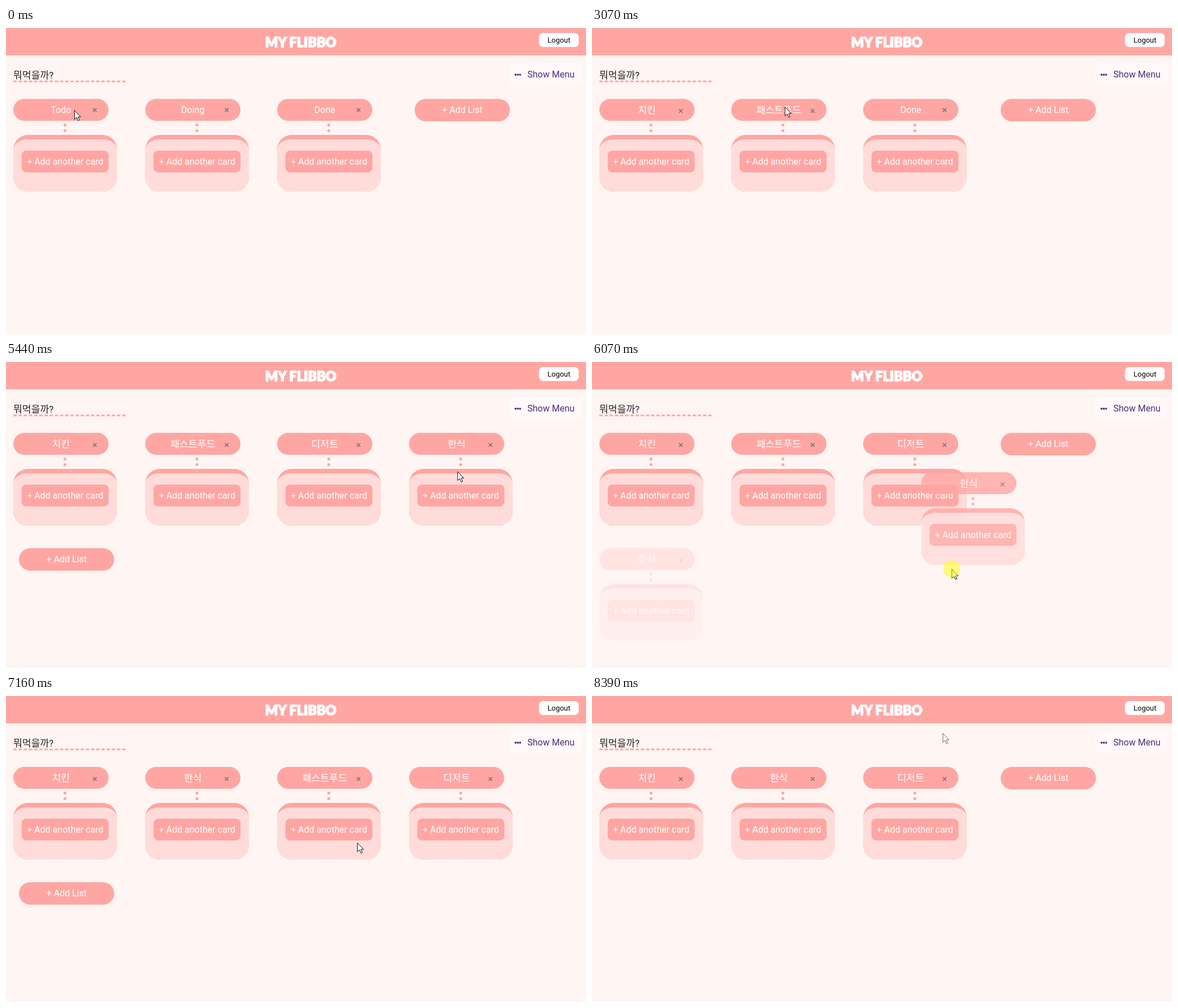
An HTML page for the animation above (8.63 s loop, 1029 by 544 pixels).

```html
<!DOCTYPE html>
<html lang="ko">
<head>
<meta charset="utf-8">
<title>Board</title>
<style>
  html, body { margin: 0; width: 100%; height: 100%; overflow: hidden; background: #fff5f3; }
  svg { display: block; width: 1029px; height: 544px; }
  text { font: 16px Roboto, 'Noto Sans CJK KR', 'Noto Sans CJK', sans-serif; white-space: pre; }
  .mid { text-anchor: middle; }
  .w { fill: #fff; }
  .main { fill: #ffa6a3; }
  .soft { fill: #ffdcda; }
  .logo { font: 900 23.5px Lato, sans-serif; stroke: #fff; stroke-width: 1.5; stroke-linejoin: round; }
  .box { filter: drop-shadow(0 1px 2px rgba(0, 0, 0, .5)); }
</style>
</head>
<body>
<svg viewBox="0 0 1029 544">
  <rect width="1029" height="544" fill="#fff5f3"/>
  <rect class="main" width="1029" height="48.7"/>
  <text class="logo mid w" x="523" y="33.5">MY FLIBBO</text>
  <rect class="w" x="945.6" y="9" width="70.4" height="24.7" rx="7"/>
  <text class="mid" x="981" y="26" style="font-size:13px">Logout</text>
  <text x="13" y="89.5" fill="#222" style="font-size:17.2px">뭐먹을까?</text>
  <path d="M13 95H212" stroke="#ffa6a3" stroke-width="3" stroke-dasharray="6 3.19"/>
  <rect x="892" y="62" width="129" height="40" rx="7" fill="#fffaf9"/>
  <g fill="#4b1f6f">
    <circle cx="904" cy="83" r="1.8"/><circle cx="908" cy="83" r="1.8"/><circle cx="912" cy="83" r="1.8"/>
    <text x="925" y="87.5" fill="#4f2a7f">Show Menu</text>
  </g>
  <g id="board"></g>
  <g id="status">
    <path d="M0 525.5H101Q105 525.5 105 529.5V544H0Z" fill="#dee1e6" stroke="#cfd2d8"/>
    <text x="98.5" y="541" text-anchor="end" fill="#4a4d52" style="font-size:12px">localhost:8080/b/2</text>
  </g>
  <g id="dialog">
    <rect class="box w" x="289" y="-10" width="446" height="98" rx="2"/>
    <text x="305" y="19" fill="#5c5055" style="font-size:13.9px">list를 삭제하시겠습니까?</text>
    <rect x="583.5" y="40.5" width="64" height="32" rx="3" fill="#4489ee" stroke="#7fb0f5"/>
    <text class="mid w" x="615.5" y="60.5" style="font-size:13px;font-weight:500">확인</text>
    <rect x="655.5" y="40.5" width="63" height="31" rx="3" fill="#fff" stroke="#dcdcdc"/>
    <text class="mid" x="687" y="60.5" fill="#4a8df0" style="font-size:13px;font-weight:500">취소</text>
  </g>
  <g id="cursor" stroke-linejoin="round">
    <path id="arrow" d="M.5 .5V16.3L4.2 12.9L6.9 18.8L9.3 17.8L6.7 12H11.3Z" fill="#fff" stroke="#111"/>
    <path id="beam" d="M-3.5 -8H-1L0 -7L1 -8H3.5M0 -7V7M-3.5 8H-1L0 7L1 8H3.5" fill="none" stroke="#1f5558" stroke-width="1.3"/>
    <path id="hand" d="M.5 2Q.5 .5 2.1 .5T3.8 2V8.5Q5.5 7 7 8.8Q9 7.7 10 9.5Q12.5 8.8 12.5 11.5V16Q12.5 19 10.8 20V22.5H2.2V20.5Q0 18 -3.7 13Q-4.7 11 -3 10.5Q-1.2 10.3 .5 13ZM3.8 8.5V12M7 8.8V12M10 9.5V12.5" fill="#fff" stroke="#111"/>
    <circle id="press" r="15" fill="#ff0" opacity=".5"/>
  </g>
</svg>
<script>
const LOOP = 8630, ERASE = 88, TYPE = 64;
const HOVER = 7400, ASK = 7700, REMOVE = 8230, FADE = 8385;
const INITIALS = 'ㄱㄲㄴㄷㄸㄹㅁㅂㅃㅅㅆㅇㅈㅉㅊㅋㅌㅍㅎ';
const $ = id => document.getElementById(id);
const at = (rows, t) => rows.filter(r => r[0] <= t).pop();

// what the input shows while Hangul is composed key by key
function strokes(word) {
  const shown = [];
  [...word].forEach((ch, i) => {
    const code = ch.charCodeAt(0) - 0xAC00, tail = code % 28, done = word.slice(0, i);
    shown.push(done + INITIALS[Math.floor(code / 588)]);
    shown.push(done + String.fromCharCode(0xAC00 + code - tail));
    if (tail) shown.push(done + ch);
  });
  return shown;
}

// title history: backspace the old name, type the new one, commit
function rename(old, word, eraseAt, typeAt, doneAt) {
  const erased = [...old, ''].map((_, i) => [eraseAt + i * ERASE, old.slice(0, old.length - i), true]);
  const typed = strokes(word).map((s, i) => [typeAt + i * TYPE, s, true]);
  return [[0, old], ...erased, ...typed, [doneAt, word]];
}

const titles = {
  a: rename('Todo', '치킨', 90, 510, 985),
  b: rename('Doing', '패스트푸드', 1590, 2190, 2915),
  c: rename('Done', '디저트', 3480, 3860, 4255),
  d: [[0, '한식']],
  add: [[0, '+ Add List'], [4635, '', true],
    ...strokes('한식').map((s, i) => [4710 + i * TYPE, s, true]), [5325, '+ Add List']]
};

const orders = [[0, 'abc+'], [5325, 'abcd+'], [5990, 'abc+d'], [6140, 'abdc+'], [6600, 'adbc+'], [REMOVE, 'adc+']];

// start, list, grab offset
const drags = [[0], [5695, 'd', 54, 172], [6225], [6450, 'b', 84, 192], [7005]];

// start, end, x, y, pointer once at rest
const moves = [
  [0, 0, 121, 146, 'arrow'],
  [80, 90, 126, 140, 'beam'],
  [990, 1460, 342, 140, 'beam'],
  [3070, 3450, 598, 140, 'beam'],
  [4050, 4110, 598, 125, 'arrow'],
  [4260, 4560, 815, 148, 'hand'],
  [5330, 5630, 769, 298, 'arrow'],
  [5700, 5900, 740, 372, 'arrow'],
  [5900, 6070, 638, 368, 'arrow'],
  [6080, 6420, 331, 318, 'arrow'],
  [6460, 6610, 470, 320, 'arrow'],
  [6800, 6850, 621, 317, 'arrow'],
  [7010, HOVER, 627, 148, 'hand'],
  [7940, 8160, 616, 58, 'arrow'],
  [8240, 8380, 622, 66, 'arrow']
];

function pointer(t) {
  const move = at(moves, t), [start, end, x, y, kind] = move;
  if (t >= end) return [x, y, kind];
  const [, , x0, y0] = moves[moves.indexOf(move) - 1];
  const k = (t - start) / (end - start), e = k * k * (3 - 2 * k);
  return [x0 + (x - x0) * e, y0 + (y - y0) * e, 'arrow'];
}

function el(parent, tag, attrs, text) {
  const node = document.createElementNS('http://www.w3.org/2000/svg', tag);
  for (const k in attrs) node.setAttribute(k, attrs[k]);
  if (text) node.textContent = text;
  return parent.appendChild(node);
}

function pill(height) {
  const g = el($('board'), 'g', {});
  el(g, 'rect', { class: 'main', width: 169, height, rx: height / 2 });
  const label = el(g, 'text', {});
  const caret = el(g, 'rect', { class: 'w', y: 12.5, width: 1, height: 14 });
  return { g, label, caret };
}

function list() {
  const p = pill(39), g = p.g;
  p.cross = el(g, 'path', { d: 'M-3.2 -3.2L3.2 3.2M3.2 -3.2L-3.2 3.2', 'stroke-width': 1.5 });
  for (const cy of [46.5, 56.5]) el(g, 'circle', { class: 'main', cx: 91.7, cy, r: 2.6 });
  el(g, 'rect', { class: 'main', y: 64, width: 184, height: 101, rx: 26 });
  el(g, 'path', { class: 'soft', d: 'M0 90A26 18 0 0 1 26 72H158A26 18 0 0 1 184 90V139A26 26 0 0 1 158 165H26A26 26 0 0 1 0 139Z' });
  el(g, 'rect', { class: 'main', x: 14.8, y: 92, width: 154.4, height: 38.7, rx: 8 });
  el(g, 'text', { class: 'mid w', x: 92, y: 116.5 }, '+ Add another card');
  return p;
}

function show(node, on) { node.style.display = on ? '' : 'none'; }

function setLabel(p, [, text, editing]) {
  const korean = /[ㄱ-힣]/.test(text);
  p.label.textContent = text;
  p.label.setAttribute('class', editing ? 'w' : 'mid w');
  p.label.setAttribute('x', editing ? 12 : 84.5);
  p.label.setAttribute('y', editing ? 24.5 : korean ? 26.3 : 25);
  p.label.style.fontSize = (editing ? korean ? 14.9 : 14 : korean ? 17.2 : 16) + 'px';
  const caret = editing && korean;
  show(p.caret, caret);
  if (caret) p.caret.setAttribute('x', 12 + p.label.getComputedTextLength());
  if (p.cross) p.cross.setAttribute('transform', `translate(144.5 ${korean && !editing ? 21.5 : 19.8})`);
}

function place(p, x, y, opacity, history, t, cross = '#72707c') {
  p.g.setAttribute('transform', `translate(${x} ${y})`);
  p.g.setAttribute('opacity', opacity);
  setLabel(p, at(history, t));
  if (p.cross) p.cross.setAttribute('stroke', cross);
}

const add = pill(40);
const lists = { a: list(), b: list(), c: list(), d: list() };
const ghost = list();

function draw(t) {
  const order = at(orders, t)[1];
  const [, held, dx, dy] = at(drags, t);
  const [x, y, kind] = pointer(t);
  const hover = t >= HOVER && kind === 'hand';
  const slot = key => {
    const i = order.indexOf(key);
    return [13 + 234 * (i % 4), 126 + 205 * Math.floor(i / 4)];
  };

  const [ax, ay] = slot('+');
  place(add, ax + 10, ay, 1, titles.add, t);

  for (const key in lists) {
    const on = order.includes(key);
    show(lists[key].g, on);
    if (on) place(lists[key], ...slot(key), key === held ? .2 : 1, titles[key], t, hover && key === 'b' ? '#fff' : undefined);
  }

  show(ghost.g, held);
  if (held) place(ghost, x - dx, y - dy, .8, titles[held], t);

  show($('status'), t >= HOVER && t < REMOVE);
  show($('dialog'), t >= ASK && t < REMOVE);

  for (const k of ['arrow', 'beam', 'hand']) show($(k), k === kind);
  show($('press'), held);
  $('cursor').setAttribute('transform', `translate(${x} ${y})`);
  $('cursor').setAttribute('opacity', t > FADE ? .6 : 1);
}

function frame() {
  draw(performance.now() % LOOP);
  requestAnimationFrame(frame);
}
frame();
</script>
</body>
</html>
```
